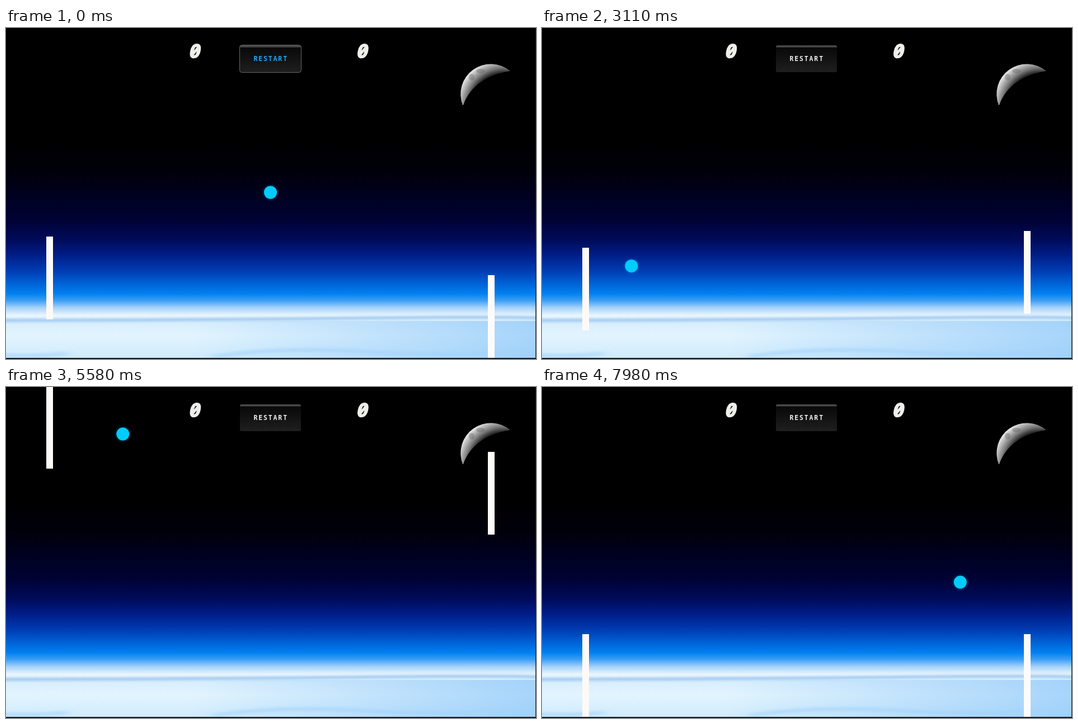
An HTML page that plays this animation: 947 px wide and 592 px high, repeating every 8000 ms.

```html
<!DOCTYPE html>
<html lang="en">
<head>
<meta charset="utf-8">
<title>Paddle game</title>
<style>
  html, body { margin: 0; width: 100%; height: 100%; overflow: hidden; background: #000; }
  svg {
    display: block;
    background: linear-gradient(#000 200px, #00000c 260px, #000234 343px, #000b5a 379px,
      #001f8a 408px, #003db4 435px, #0080f0 475px, #3a9df4 487px, #a4d1fa 500px,
      #eaf6fe 514px, #d8eefd 526px, #e2f4fe 550px, #d0ebfd 590px);
  }
  .score { font: 800 33px "Noto Sans Mono", monospace; fill: #eeeeea; stroke: #eeeeea; stroke-width: 2; }
  .label { font: 700 11.5px "DejaVu Sans Mono", monospace; letter-spacing: 1.85px; }
</style>
</head>
<body>
<svg width="947" height="592" viewBox="0 0 947 592">
  <defs>
    <linearGradient id="shade">
      <stop offset=".35" stop-color="#80c0f8" stop-opacity="0"/>
      <stop offset="1" stop-color="#80c0f8" stop-opacity=".6"/>
    </linearGradient>
    <linearGradient id="panel" x2="0" y2="1">
      <stop offset=".06" stop-color="#484848"/>
      <stop offset=".09" stop-color="#090909"/>
      <stop offset="1" stop-color="#1f1f1f"/>
    </linearGradient>
    <radialGradient id="lunar" gradientUnits="userSpaceOnUse" cx="890" cy="140" r="86">
      <stop offset=".66" stop-color="#0a0a0a"/>
      <stop offset=".8" stop-color="#777"/>
      <stop offset="1" stop-color="#eee"/>
    </radialGradient>
    <radialGradient id="glow">
      <stop offset=".7" stop-color="#00ccff" stop-opacity=".18"/>
      <stop offset="1" stop-color="#00ccff" stop-opacity="0"/>
    </radialGradient>
    <filter id="soft" x="-20%" y="-100%" width="140%" height="300%"><feGaussianBlur stdDeviation="8 2"/></filter>
  </defs>

  <rect y="524" width="947" height="66" fill="url(#shade)"/>
  <g filter="url(#soft)" fill="none">
    <path d="M-20 523Q300 523 620 519T970 520" stroke="#9bc6ef" stroke-width="5"/>
    <path d="M-20 585Q60 588 110 582M370 588Q480 570 640 579T960 576" stroke="#a4d3fa" stroke-width="7" opacity=".6"/>
  </g>

  <path d="M816 138A54 54 0 0 1 901 77C866 82 830 100 817 138z" fill="url(#lunar)"/>
  <g fill="#666" opacity=".4">
    <ellipse cx="848" cy="77" rx="8" ry="4"/>
    <ellipse cx="832" cy="88" rx="5" ry="6"/>
  </g>

  <text class="score" transform="translate(326 52.5) skewX(-12)">0</text>
  <text class="score" transform="translate(625.5 52.5) skewX(-12)">0</text>
  <rect x="418" y="31" width="109" height="48" rx="3" fill="url(#panel)"/>
  <rect id="border" x="417.5" y="30.5" width="110" height="49" rx="4" fill="none" stroke="#666"/>
  <text id="label" class="label" x="442.5" y="59">RESTART</text>

  <rect id="left" x="72" width="12" height="148" fill="#fdf9f7"/>
  <rect id="right" x="861" width="12" height="148" fill="#fdfbfa"/>
  <g id="ball">
    <circle r="16" fill="url(#glow)"/>
    <circle r="11.5" fill="#00ccff"/>
  </g>
  <path d="M0 590H946V0H947V592H0z" fill="#101820"/>
</svg>
<script>
  const LOOP = 8000, SERVE = 490, FLOOR = 442, STEP = 9.865, KEY_REPEAT = 20;
  const [border, label, left, right, ball] =
    ["border", "label", "left", "right", "ball"].map(id => document.getElementById(id));

  // Ball path with its bounces unfolded: [time, x, y].
  const path = [[SERVE, 472.5, 294], [2380, 1327, 593.5], [3820, 2093, 863], [4760, 2698, 1044.5],
    [6160, 3760, 1337], [6960, 4486, 1514], [7980, 5319, 1749.5]];
  // Held keys: [time, steps up].
  const leftKeys = [[2000, 7], [2395, -12], [3060, 10], [4360, 33], [6360, -38], [7680, -7]];
  const rightKeys = [[1150, 8], [3300, 24], [4450, 10], [5400, -14], [7200, -28]];
  const stalls = [[620, 1070], [4760, 5200]];

  const clamp = (v, lo, hi) => Math.min(hi, Math.max(lo, v));

  // Reflects an unfolded position between two walls.
  function bounce(v, lo, hi) {
    const span = hi - lo, d = (v - lo) % (2 * span);
    return lo + (d > span ? 2 * span - d : d);
  }

  function ballAt(t) {
    const next = clamp(path.findIndex(([time]) => time > t), 1, path.length - 1);
    const [t0, x0, y0] = path[next - 1], [t1, x1, y1] = path[next];
    const k = Math.max(0, (t - t0) / (t1 - t0));
    return [bounce(x0 + (x1 - x0) * k, 84, 862), bounce(y0 + (y1 - y0) * k, 12, 578)];
  }

  function paddleY(keys, firstStep, t) {
    const steps = keys.reduce((sum, [time, count]) =>
      sum + Math.sign(count) * clamp(Math.round((t - time) / KEY_REPEAT), 0, Math.abs(count)), firstStep);
    return Math.round(FLOOR - STEP * steps);
  }

  function draw(now) {
    const time = now % LOOP;
    const stall = stalls.find(([from, to]) => time >= from && time < to);
    const t = stall ? stall[0] : time;
    label.setAttribute("fill", t < 130 ? "#18aaff" : t < 270 ? "#88ccf0" : "#eee");
    border.setAttribute("opacity", t < 130 ? 1 : t < 270 ? .5 : 0);
    left.setAttribute("y", paddleY(leftKeys, 7, t));
    right.setAttribute("y", paddleY(rightKeys, 0, t));
    ball.setAttribute("transform", `translate(${ballAt(t)})`);
    requestAnimationFrame(() => draw(performance.now() - start));
  }

  const start = performance.now();
  draw(0);
</script>
</body>
</html>
```
